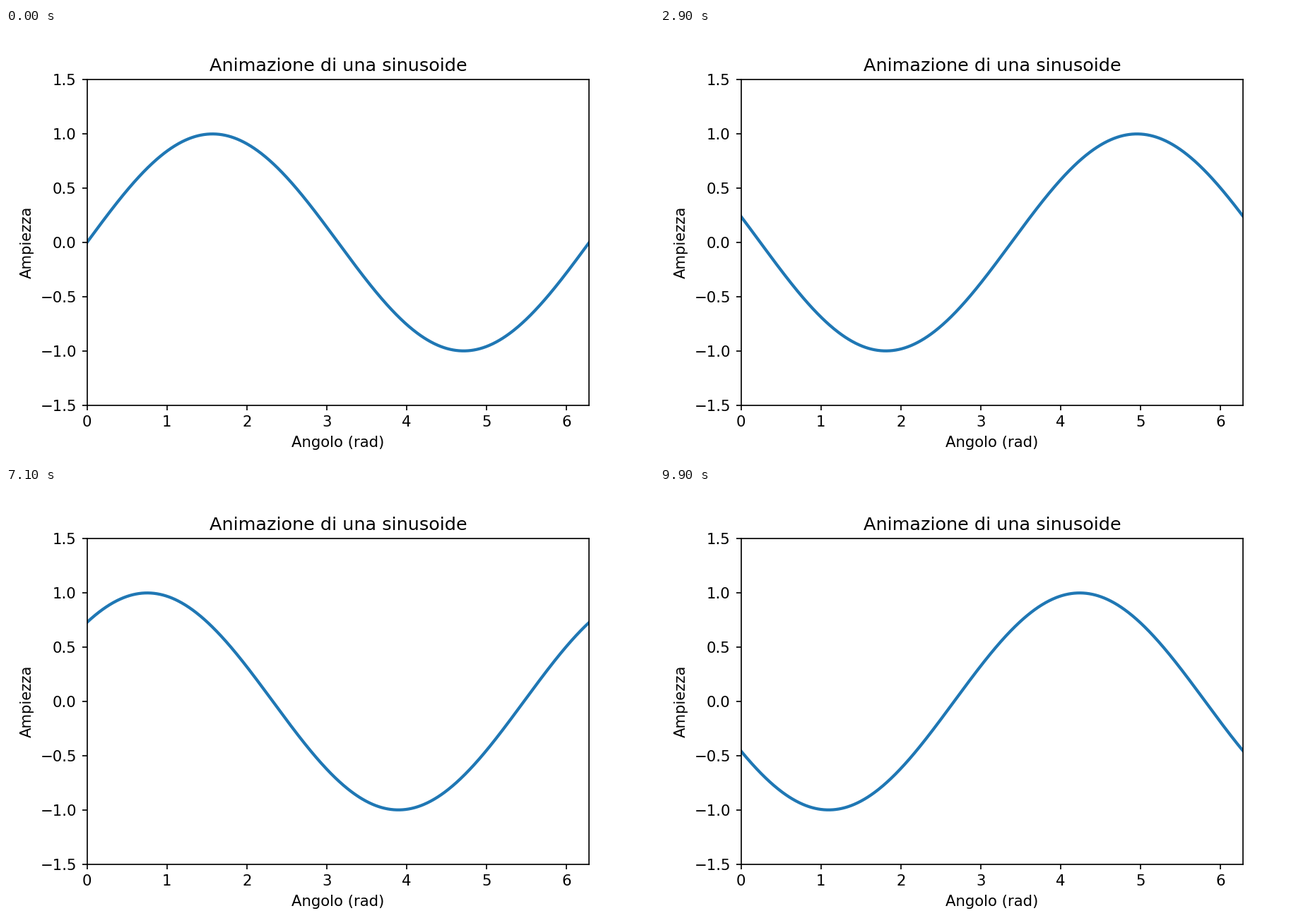
A matplotlib script for the animation above (10000 ms loop, 917 by 611 pixels).

```python
import numpy as np
import matplotlib.pyplot as plt
from matplotlib.animation import FuncAnimation

WIDTH, HEIGHT, DPI = 917, 611, 152.8
FRAMES, INTERVAL = 100, 100
PHASE_STEP = 0.1

plt.rcParams["font.family"] = "DejaVu Sans"

# The small margin keeps the pixel size from being rounded down.
fig, ax = plt.subplots(
    figsize=((WIDTH + 0.01) / DPI, (HEIGHT + 0.01) / DPI), dpi=DPI
)
fig.subplots_adjust(left=0.125, right=0.9, bottom=0.125, top=0.88)

ax.set_xlim(0, 2 * np.pi)
ax.set_ylim(-1.5, 1.5)
ax.set_title("Animazione di una sinusoide")
ax.set_xlabel("Angolo (rad)")
ax.set_ylabel("Ampiezza")

x = np.linspace(0, 2 * np.pi, 1000)
line, = ax.plot(x, np.sin(x), color="#1f77b4", lw=2)


def update(i):
    line.set_ydata(np.sin(x + PHASE_STEP * i))
    return line,


anim = FuncAnimation(fig, update, frames=FRAMES, interval=INTERVAL,
                     blit=True, repeat=True)
plt.show()
```
